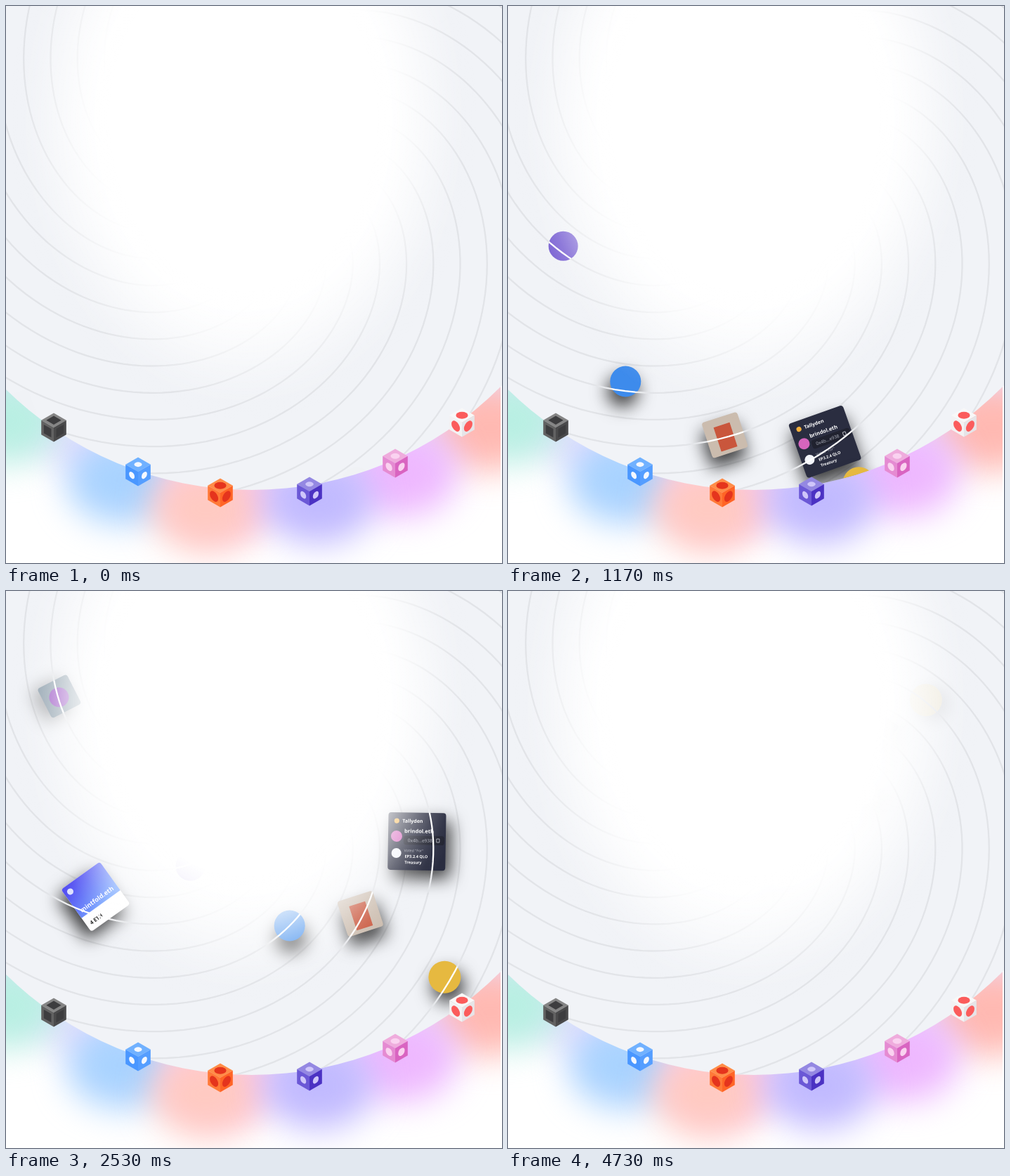
Animation of 706 by 793 pixels, one loop 5010 ms. Source, as an HTML page with a canvas:

```html
<!DOCTYPE html>
<html lang="en">
<head>
<meta charset="utf-8">
<style>
  html, body { margin: 0; height: 100%; overflow: hidden; background: #fff; }
  canvas { display: block; width: 706px; height: 793px; }
</style>
</head>
<body>
<canvas id="stage"></canvas>
<script>
const W = 706, H = 793, LOOP = 5.01, END = 4.73, TAU = Math.PI * 2;
const RIGHT_EDGE = 704;

function layer(canvas = document.createElement('canvas')) {
  canvas.width = W;
  canvas.height = H;
  return canvas.getContext('2d');
}
const stage = layer(document.getElementById('stage'));
const backdrop = layer(), moving = layer(), overlay = layer();

const disc = new Path2D();
disc.arc(350, 189, 500, 0, TAU);

// The swirl is 24 involutes of one base circle.
// A point lies at the end of a string of length reach, pulled in direction angle.
const hub = { x: 355, y: 221, r: 146 };
const ARMS = 24, GAP = TAU * hub.r / ARMS, PHASE = 24 - hub.r * Math.PI / 2;

function unwind(reach, angle) {
  const c = Math.cos(angle), s = Math.sin(angle);
  return [hub.x - hub.r * s + reach * c, hub.y + hub.r * c + reach * s];
}

const arms = Array.from({ length: ARMS }, (_, k) => {
  const arm = new Path2D();
  for (let reach = 90; reach < 720; reach += 6)
    arm.lineTo(...unwind(reach, (reach - PHASE - k * GAP) / hub.r));
  return arm;
});

function strokeArm(g, arm, color) {
  g.strokeStyle = color;
  g.lineWidth = 2.3;
  g.stroke(arm);
}

function circle(g, x, y, r, color) {
  g.fillStyle = color;
  g.beginPath();
  g.arc(x, y, r, 0, TAU);
  g.fill();
}

function box(g, x, y, w, h, r, color) {
  g.fillStyle = color;
  g.beginPath();
  g.roundRect(x, y, w, h, r);
  g.fill();
}

function label(g, text, x, y, size, color, weight = 700) {
  g.font = `${weight} ${size}px "Noto Sans", sans-serif`;
  g.fillStyle = color;
  g.fillText(text, x, y);
}

function clipToStage(g) {
  g.beginPath();
  g.rect(0, 0, RIGHT_EDGE, H);
  g.clip();
}

function paintBackdrop(g) {
  g.fillStyle = '#fff';
  g.fillRect(0, 0, W, H);
  g.save();
  clipToStage(g);
  g.filter = 'blur(24px)';
  g.strokeStyle = '#e6dcff';
  g.lineWidth = 70;
  g.stroke(disc);
  const glow = (x, y, color) => {
    g.fillStyle = color;
    g.beginPath();
    g.ellipse(x, y, 78, 62, 0, 0, TAU);
    g.fill();
  };
  glow(0, 590, '#b9efe3');
  glow(690, 600, '#ffb9b2');
  glow(165, 675, '#a9d3ff');
  glow(565, 665, '#eeb8ff');
  glow(310, 690, '#ffc6f0');
  glow(285, 716, '#ffcac2');
  glow(445, 704, '#c1baff');
  g.restore();

  g.fillStyle = '#f1f3f7';
  g.fill(disc);
  g.save();
  g.clip(disc);
  arms.forEach(arm => strokeArm(g, arm, '#e2e4e8'));
  g.restore();
}

function cube(g, x, y, [top, left, right, mark], size = 0.27, square = false) {
  const w = 17.8, r = 20.5;
  const face = (color, ...matrix) => {
    g.save();
    g.transform(...matrix);
    g.fillStyle = color;
    g.fillRect(-0.5, -0.5, 1, 1);
    if (square) box(g, -size, -size, size * 2, size * 2, 0, mark);
    else circle(g, 0, 0, size, mark);
    g.restore();
  };
  face(top, w, r / 2, w, -r / 2, x, y - r / 2);
  face(left, w, r / 2, 0, r, x - w / 2, y + r / 4);
  face(right, w, -r / 2, 0, r, x + w / 2, y + r / 4);
}

function paintOverlay(g) {
  // White haze: solid inside, smoothstep to clear outside.
  const inner = 0.93, outer = 1.62;
  const haze = g.createRadialGradient(0, 0, inner, 0, 0, outer);
  for (let u = 0; u <= 1; u += 0.125)
    haze.addColorStop(u, `rgba(255,255,255,${1 - u * u * (3 - 2 * u)})`);
  g.save();
  g.translate(338, 160);
  g.scale(205, 265);
  circle(g, 0, 0, outer, haze);
  g.restore();

  cube(g, 68, 600, ['#858585', '#626262', '#4a4a4b', '#3d3d3f'], 0.3, true);
  cube(g, 188, 663, ['#70b1ff', '#4a97ff', '#559eff', '#f4f8ff'], 0.22);
  cube(g, 305, 693, ['#ff8d48', '#ff7a38', '#ff6526', '#e5341d'], 0.34);
  cube(g, 432, 691, ['#9488e2', '#6b58d6', '#4b32c3', '#cfc6fa'], 0.23);
  cube(g, 554, 651, ['#efacdd', '#e58bd2', '#d964c1', '#fad2f0'], 0.26);
  cube(g, 649, 593, ['#f8f8f8', '#f3f2f3', '#e6e5e8', '#fb5c5c'], 0.34);
}

const coin = (r, color) => g => circle(g, 0, 0, r, color);

// A card casts the shadow; what is printed on it does not.
function card(g, w, h, color) {
  box(g, -w / 2, -h / 2, w, h, 4, color);
  g.shadowColor = 'transparent';
}

function melonArt(g) {
  card(g, 53, 53, '#cbbcae');
  box(g, -12, -15, 24, 36, 0, '#c9563c');
}

function punkArt(g) {
  card(g, 47, 47, '#8fa0ad');
  circle(g, -1, 1, 14, '#9b57c4');
}

function voteCard(g) {
  card(g, 82, 82, '#2a2d40');
  g.translate(-41, -41);
  circle(g, 12, 12, 3.6, '#f5b03c');
  label(g, 'Tallyden', 20, 14.5, 7, '#fff');
  circle(g, 12, 34, 8, '#d765bd');
  label(g, 'brindol.eth', 23, 29, 7.5, '#fff');
  box(g, 22, 33, 58, 13, 4, '#20222f');
  label(g, '0x4b...e938', 28, 42, 6.5, '#a9acb8', 400);
  g.strokeStyle = '#c9cbd3';
  g.lineWidth = 0.8;
  g.strokeRect(69, 37, 4, 5);
  circle(g, 12, 58, 7, '#f3f5fb');
  label(g, 'Voted "For"', 23, 56, 5.2, '#a9acb8', 400);
  label(g, 'EP3.2.4 QLO', 24, 64.5, 5.6, '#fff');
  label(g, 'Treasury', 24, 73, 5.6, '#fff');
}

function nameCard(g) {
  card(g, 68, 74, '#fff');
  const blue = g.createLinearGradient(-10, -37, 10, 13);
  blue.addColorStop(0, '#5450f2');
  blue.addColorStop(1, '#76a5ff');
  box(g, -34, -37, 68, 50, [4, 4, 0, 0], blue);
  circle(g, -25, -27, 4.5, '#dfe3ff');
  label(g, 'mintfold.eth', -29, 7, 9, '#fff', 600);
  label(g, '4 ETH', -28, 29, 7.5, '#222');
}

// Each item winds in steadily: reach, angle and tilt hold at MID seconds, the rates are per second.
const MID = 2;
const items = [
  { draw: coin(21, '#7a62d3'), shade: 0, enter: 0, reach: 181, pull: 100, angle: 1.61, spin: 0.741 },
  { draw: coin(22, '#3d8bec'), enter: 0, reach: 262, pull: 88, angle: 1.143, spin: 0.671 },
  { draw: melonArt, enter: 0, reach: 289, pull: 91, angle: 0.795, spin: 0.619, tilt: -18 },
  { draw: voteCard, enter: 0, reach: 286, pull: 118, angle: 0.351, spin: 0.748, tilt: -7, turn: 15 },
  { draw: punkArt, shade: 0.35, enter: 1.1, reach: 286, pull: 71, angle: 3.125, spin: 0.5, tilt: -27 },
  { draw: nameCard, enter: 1.57, reach: 339, pull: 118, angle: 2.346, spin: 0.84, tilt: -33, turn: -5 },
  { draw: coin(23, '#e6b940'), enter: 1.88, reach: 447, pull: 90, angle: 0.879, spin: 0.65 },
];

function paintItem(g, item, time) {
  const { draw, shade = 0.75, enter, reach, pull, angle, spin, tilt = 0, turn = 0 } = item;
  const t = Math.max(time, enter) - MID;
  const [x, y] = unwind(Math.max(reach - pull * t, 0), angle - spin * t);
  const dx = x - hub.x, dy = y - hub.y, away = Math.hypot(dx, dy);
  g.save();
  g.translate(x, y);
  g.rotate((tilt + turn * t) * Math.PI / 180);
  g.shadowColor = `rgba(0,0,0,${shade})`;
  g.shadowBlur = 24;
  g.shadowOffsetX = 8 * dx / away;
  g.shadowOffsetY = 8 * dy / away + 7;
  draw(g);
  g.restore();

  // The arm an item follows shows white on it and its shadow.
  const track = Math.ceil((reach - hub.r * angle - PHASE) / GAP);
  g.save();
  g.beginPath();
  g.arc(x, y, 75, 0, TAU);
  g.clip();
  g.globalCompositeOperation = 'source-atop';
  strokeArm(g, arms[track], '#fff');
  g.restore();
}

function paintMoving(g, time) {
  g.clearRect(0, 0, W, H);
  g.save();
  clipToStage(g);
  g.clip(disc);
  items.forEach(item => paintItem(g, item, time));
  g.restore();
}

function frame() {
  const time = Math.min(performance.now() / 1000 % LOOP, END);
  paintMoving(moving, time);
  stage.drawImage(backdrop.canvas, 0, 0);
  stage.globalAlpha = Math.min(1, time / 0.3, (END + 0.05 - time) / 0.4);
  stage.drawImage(moving.canvas, 0, 0);
  stage.globalAlpha = 1;
  stage.drawImage(overlay.canvas, 0, 0);
  requestAnimationFrame(frame);
}

paintBackdrop(backdrop);
paintOverlay(overlay);
frame();
</script>
</body>
</html>
```
